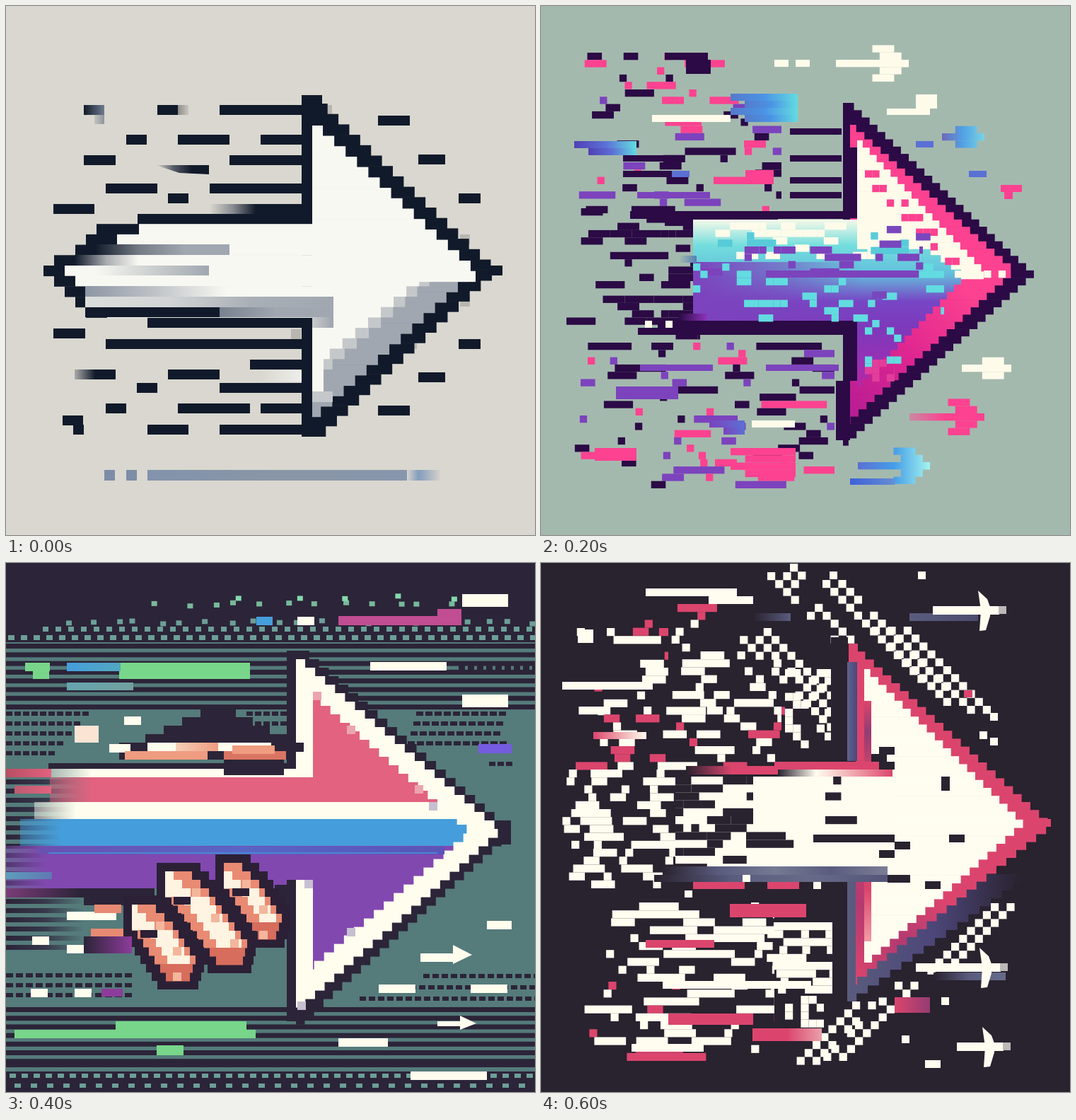
An HTML page with a canvas for the animation above (0.8 s loop, 748x748 px).

```html
<!DOCTYPE html>
<html lang="en">
<head>
<meta charset="utf-8">
<title>Arrow</title>
<style>
html, body { margin: 0; width: 100%; height: 100%; overflow: hidden; background: #d9d7cf; }
canvas { display: block; width: 100vw; height: 100vh; }
</style>
</head>
<body>
<canvas id="stage" width="748" height="748"></canvas>
<script>
const g = document.getElementById('stage').getContext('2d');
const HOLD = 200;
let seed = 1;
const rnd = () => (seed = seed * 16807 % 2147483647) / 2147483647;
const pick = list => list[Math.floor(rnd() * list.length)];
const lerp = (a, b, t) => a + (b - a) * t;

function box(c, x, y, w, h) {
  g.fillStyle = c;
  g.fillRect(x, y, w, h);
}
function ramp(x0, y0, x1, y1, colors) {
  const r = g.createLinearGradient(x0, y0, x1, y1);
  colors.forEach((c, i) => r.addColorStop(i / (colors.length - 1), c));
  return r;
}
const fade = (x, y, w, h, ...colors) => box(ramp(x, 0, x + w, 0, colors), x, y, w, h);

function poly(c, ...v) {
  g.fillStyle = c;
  g.beginPath();
  for (let i = 0; i < v.length; i += 2) g.lineTo(v[i], v[i + 1]);
  g.fill();
}
// Equal bars at several places
function spots(c, w, h, ...places) {
  for (const [x, y] of places) box(c, x, y, w, h);
}
// Triangle pointing right with stepped edges
function wedge(c, s, left, [ax, ay], [tx, ty], [bx, by]) {
  for (let y = ay; y < by - 1; y += s) {
    const m = y + s / 2;
    const edge = m < ty ? lerp(ax, tx, (m - ay) / (ty - ay)) : lerp(tx, bx, (m - ty) / (by - ty));
    box(c, left, y, Math.max(0, edge - left), s + 0.6);
  }
}
// Random runs of cells; density may depend on x
function scatter(c, s, x0, y0, x1, y1, density, run = 1) {
  for (let y = y0; y < y1 - 1; y += s)
    for (let x = x0; x < x1;) {
      const n = 1 + Math.floor(rnd() * run);
      const p = typeof density === 'function' ? density(x) : density;
      if (rnd() < p) box(c, x, y, Math.min(n * s, x1 - x), s);
      x += n * s;
    }
}
// Rows of loose dashes with random lengths and gaps
function streaks(colors, s, x0, y0, x1, y1, len, gap) {
  for (let y = y0; y < y1 - 1; y += s)
    for (let x = x0 + rnd() * gap; x < x1;) {
      const w = s * Math.ceil(rnd() * rnd() * len);
      box(pick(colors), x, y, Math.min(w, x1 - x), s);
      x += w + s + rnd() * gap;
    }
}
function dots(c, x0, x1, y, step, w, h) {
  for (let x = x0; x < x1; x += step) box(c, x, y, w, h);
}
function sparseDots(c, x0, x1, y, step) {
  for (let x = x0; x < x1; x += step) box(c, x + rnd() * step / 2, y + rnd() * 6, 8, 7);
}
// Diagonal chequered band; dir is 1 for falling, -1 for rising
function checker(c, s, x, y, rows, cols, dir) {
  for (let r = 0; r < rows; r++)
    for (let k = 0; k < cols; k++)
      if (rnd() < 0.85) box(c, x + (dir * r + 2 * k) * s, y + r * s, s, s);
}
// Small arrow: a bar with a stepped head
function mini(c, x, y, len, s, reach) {
  box(c, x, y, len, s);
  for (let k = -reach; k <= reach; k++) {
    const a = Math.abs(k);
    box(c, x + len - (a + 3) * s, y + k * s, 3 * s, s);
  }
}
function blob(x, y, w, rows, s, ...colors) {
  for (let i = 0; i < rows; i++) {
    const inset = (i % 2) * 2 * s;
    fade(x + inset, y + i * s, w - inset, s, ...colors);
  }
}

function ink() {
  const bg = '#d9d7cf', dark = '#111a2a', white = '#f8f8f2', grey = '#a0a7b0', pale = '#c5c8ca';
  const s = 14.7, mid = 374;
  box(bg, 0, 0, 748, 748);

  // Speed lines
  const lines = [[302, 140], [360, 182], [316, 211], [288, 251], [141, 471], [345, 500], [302, 533], [360, 562], [302, 592]];
  for (const [x, y] of lines) box(dark, x, y, 418 - x, 14);
  spots(dark, 29, 14, [214, 140], [170, 182], [229, 265], [185, 533], [141, 562], [80, 579]);
  spots(dark, 45, 14, [110, 211], [67, 456]);
  spots(dark, 58, 14, [67, 280], [200, 592]);
  spots(dark, 73, 14, [243, 182], [141, 251], [229, 514]);
  box(dark, 243, 562, 102, 14);
  box(dark, 95, 592, 15, 14);
  for (let i = 0; i < 3; i++)
    for (const y of [155 + i * 55, 565 - i * 47]) box(dark, 526 + i * 57, y, 45 - i * 7, 14);
  fade(110, 140, 29, 14, dark, '#6f7b90');
  fade(125, 154, 14, 13, '#c4c3c0', '#8f949d');
  fade(243, 140, 15, 14, '#8e8a89', '#c9c6bf');
  poly(ramp(212, 0, 287, 0, [bg, '#555b66', dark, dark]), 212, 225, 287, 225, 287, 238, 245, 236);
  fade(97, 514, 58, 14, '#aaa', dark, dark);
  fade(358, 515, 60, 16, bg, '#ededea');
  fade(288, 280, 130, 14, bg, '#8a8c92', dark, dark, dark);
  spots('#b9b6b1', 14, 14, [447, 140], [567, 280], [642, 323], [567, 471], [642, 411], [403, 457]);

  // Head
  box(dark, 418, 126, 29, 480);
  wedge(dark, s, 418, [447, 138], [694, mid], [447, 606]);
  box(dark, 680, 367, 22, 14);
  wedge(grey, s, 433, [440, 169], [664, mid], [440, 578]);
  wedge(pale, s, 447, [450, 381], [606, 382], [450, 516]);
  wedge(white, s, 433, [440, 169], [664, mid], [664, 381]);
  wedge(white, s, 433, [592, 381], [592, 382], [447, 500]);
  box(white, 433, 455, 16, 90);
  box(pale, 433, 545, 29, 15);

  // Shaft, pointed at its left end
  box(dark, 186, 294, 247, 15);
  box(dark, 200, 440, 233, 15);
  for (let k = -4; k <= 4; k++) {
    const y = 367 + k * s, left = 53 + 15 * Math.abs(k) + (k < -1 ? 15 : 0);
    const edge = k === -4 ? 60 : k === -3 ? 44 : 30;
    box(dark, left, y, edge, s + 0.4);
    box(white, left + edge, y, 460 - left - edge, s + 0.4);
  }
  fade(126, 337, 190, 15, dark, '#777d87', grey, grey);
  fade(97, 352, 90, 15, dark, '#a9acb0', white);
  fade(126, 367, 161, 14, white, '#cccfcf', grey);
  fade(112, 396, 200, 15, '#8d96a4', '#c0c4c8', white);
  fade(112, 411, 351, 15, '#dcdedb', '#d2d5d5', '#a9afb6', grey);
  box(dark, 112, 426, 200, 14);
  fade(302, 426, 161, 14, '#78818f', grey, grey);
  fade(433, 440, 30, 15, '#c8cacc', '#9ea5af');

  spots('#7d8da7', 15, 15, [139, 656], [170, 656]);
  fade(200, 656, 367, 15, '#8293ab', '#8996a6', '#8796ac');
  fade(568, 656, 45, 15, '#d1d1cd', '#849dbd', '#aab5c2', '#d2d0c9');
}

function neon() {
  const bg = '#a4b9ae', dark = '#2b0a45', pink = '#fc4290', cream = '#fefbea';
  const violet = '#7c43bd', cyan = '#62dce0', blue = '#5b70d5', s = 10.3;
  box(bg, 0, 0, 748, 748);

  // Loose dashes
  const mix = [dark, dark, dark, pink, pink, violet];
  streaks(mix, s, 60, 66, 260, 118, 7, 160);
  streaks(mix, s, 40, 118, 340, 285, 9, 160);
  streaks(mix, s, 40, 476, 415, 675, 9, 150);
  for (const y of [173, 211, 242, 263]) box(dark, 352, y, 73, 9);
  for (const y of [211, 233]) box(dark, 116, y, 70, 9);
  box(dark, 175, 66, 61, s);
  box(dark, 205, 76, 35, 20);
  box(cream, 157, 154, 111, 10);
  spots(cream, 20, 10, [330, 76], [360, 76]);
  box(cream, 298, 586, 61, 10);
  box(cream, 489, 145, 61, 9);
  box(cream, 530, 125, 30, 20);
  box(violet, 106, 538, 88, 18);
  spots(violet, 103, 9, [140, 507], [318, 507], [136, 263]);
  box(pink, 289, 232, 40, 20);
  box(pink, 76, 625, 59, 18);
  blob(268, 625, 92, 4, s, pink, pink);
  blob(268, 124, 95, 4, 10, '#557acb', '#4b93e5', cyan);
  blob(47, 191, 88, 2, 10, '#5040b4', blue, cyan);
  blob(238, 586, 50, 2, 10, violet, blue);
  spots(blue, 25, 9, [185, 233], [530, 191], [605, 233]);
  box(pink, 650, 253, 30, 10);
  box(pink, 655, 263, 12, 10);

  mini(cream, 417, 76, 103, s, 2);
  mini(cream, 595, 507, 70, s, 1);
  mini(ramp(521, 0, 570, 0, ['#c98aa2', pink]), 521, 576, 106, s, 2);
  mini(ramp(567, 0, 627, 0, ['#7167b9', '#51a3e4', '#79d4e5']), 567, 180, 60, s, 1);
  mini(ramp(448, 0, 550, 0, [blue, '#459de8', '#a2f5ef']), 448, 645, 102, s, 2);
  fade(437, 668, 63, 9, '#3d61d8', '#668dd4');

  // Shaft breaking up towards the left
  scatter(dark, s, 36, 286, 225, 465, x => lerp(0.12, 0.55, (x - 36) / 190), 4);
  box(dark, 126, 290, 321, 11);
  box(dark, 175, 300, 160, 11);
  box(dark, 165, 445, 282, 11);
  box(dark, 137, 455, 310, 10);
  const body = ramp(0, 300, 0, 535, [cream, '#72dddd', '#63bfdc', '#7746c5', '#7e38ba', '#9332b6', '#b528a4']);

  // Head
  box(dark, 427, 137, 10, 477);
  box(dark, 417, 530, 20, 84);
  wedge(dark, s, 427, [437, 137], [697, 379], [437, 614]);
  wedge(ramp(437, 583, 600, 400, ['#b61c94', '#df2690', pink]), s, 437, [440, 168], [670, 374], [440, 583]);
  box(dark, 427, 200, 20, 100);
  box(dark, 427, 445, 20, 85);
  wedge(cream, s, 447, [450, 190], [626, 374], [626, 380]);
  wedge(body, s, 447, [500, 311], [600, 382], [447, 540]);
  box(body, 215, 302, 240, 143);
  fade(215, 362, 240, 83, violet, '#7c43bd99', '#7c43bd00');
  fade(195, 353, 25, 10, bg, '#557fb6');
  fade(195, 435, 40, 10, dark, '#8d35ba');
  wedge(cream, s, 447, [540, 302], [560, 340], [560, 342]);
  for (let i = 0; i < 13; i++)
    for (let k = 0; k < 3; k++)
      if ((i + k) % 2 && rnd() < 0.9) box(pink, 458 + i * s, 222 + (i + k) * s, s, s);

  // Pixels inside
  scatter(cream, s, 226, 306, 447, 325, 0.6, 3);
  scatter(cream, s, 235, 327, 520, 352, 0.2, 2);
  scatter('#58cbd9', s, 250, 320, 520, 348, 0.25, 4);
  scatter(violet, s, 226, 340, 540, 372, 0.2, 3);
  box(violet, 318, 374, 222, 10);
  scatter(cyan, s, 215, 364, 570, 442, 0.18, 2);
  scatter(cyan, s, 458, 444, 510, 515, 0.2);
  scatter('#7947bd', s, 458, 311, 560, 420, 0.12, 3);
  scatter('#e33d9b', s, 458, 500, 500, 530, 0.4);
  dots(cream, 585, 660, 374, 2 * s, s, s);
  dots(cream, 147, 180, 445, 29, 10, 10);
}

function finger(x, y, w, rows, shift) {
  const left = i => x + Math.max(0, i - 2) * shift;
  const width = i => w + (i > 1 && i < rows - 2 ? 12 : i === 0 || i === rows - 1 ? -12 : 0);
  for (let i = 0; i < rows; i++) box('#2c2036', left(i) - 12, y + i * 12 - 12, width(i) + 24, 36);
  for (let i = 0; i < rows; i++) {
    const px = left(i), py = y + i * 12, pw = width(i);
    box(i > rows - 3 ? '#d76d5c' : '#e98a73', px, py, pw, 12.5);
    if (i < rows - 2) box('#fff3e1', px + (i > 2 ? 18 : 0), py, pw - 26, 12.5);
    if (i % 3 === 2) box('#f3b69c', px + pw - 24, py, 12, 12);
  }
  box('#2c2036', x + 12, y + 36, 24, 11);
}

function retro() {
  const dark = '#2c2438', teal = '#557b7b', cream = '#fffdee', green = '#78d68a', mint = '#6c9f98';
  const pink = '#e2627f', blue = '#459edb', violet = '#8148b0', magenta = '#c14d93';
  const salmon = '#ef9c80', s = 12;
  box(teal, 0, 0, 748, 748);

  // Top and bottom bands
  box(dark, 0, 0, 748, 112);
  sparseDots('#78b99b', 205, 620, 52, 37);
  sparseDots('#84d9ad', 320, 610, 42, 70);
  sparseDots(mint, 75, 748, 78, 33);
  dots(mint, 52, 748, 90, 18, 8, 7);
  dots(mint, 3, 748, 102, 18, 9, 7);
  for (let y = 114; y < 205; y += 12.3) box(dark, 0, y, 748, 7);
  for (let y = 628; y < 705; y += 12.2) box(dark, 0, y, 748, 7);
  box(dark, 0, 705, 748, 43);
  box(teal, 0, 713, 748, 6);
  dots(mint, 5, 748, 722, 17, 9, 6);
  dots(mint, 12, 748, 736, 23, 9, 6);

  // Dotted rows
  for (let i = 0; i < 5; i++) {
    const y = 210 + i * 14;
    dots(dark, 0, 110 - i * 12, y, s, 9, 6);
    if (i < 2) dots(dark, 340, 398, y, s, 9, 6);
    if (i < 4) dots(dark, 580 - i * 4, 700, y, 13, 10, 6);
    if (i < 3) dots(dark, 0, 180, 580 + i * 14, 14, 10, 6);
    if (i < 3) dots(dark, 590 - i * 45, 748, 581 + i * 16, 13, 9, 6);
  }
  dots(dark, 683, 718, 281, s, 9, 6);
  dots(dark, 640, 748, 143, 13, 9, 8);
  for (let y = 306; y < 545; y += 13) fade(0, y, 110, 7, dark, '#36384a', teal);

  // Coloured glitches
  box(green, 27, 141, 35, s);
  box(green, 38, 152, 23, s);
  box(green, 160, 141, 185, 23);
  box(green, 12, 660, 341, s);
  box(green, 155, 648, 185, s);
  box(green, 213, 682, 38, 14);
  fade(86, 141, 76, s, blue, '#52a7bf');
  fade(86, 169, 94, 11, '#65a5b0', '#72a0a0');
  box(blue, 354, 76, 23, s);
  box(magenta, 470, 75, 174, 13);
  box(magenta, 610, 65, 34, s);
  box('#755be0', 668, 256, 47, 13);
  spots(cream, 24, s, [412, 76], [167, 217], [37, 528], [86, 540], [35, 602], [97, 602]);
  spots(cream, 52, s, [527, 596], [657, 596], [586, 552]);
  spots(cream, 65, 18, [645, 44], [645, 186]);
  spots(cream, 108, s, [515, 140], [572, 719]);
  box(cream, 470, 672, 70, s);
  box(cream, 680, 506, 35, s);
  box(cream, 86, 493, 70, s);
  box(cream, 610, 648, 35, 7);
  box('#fbe4d4', 97, 230, 34, 24);
  poly(cream, 632, 540, 659, 554, 632, 567);
  poly(cream, 642, 640, 665, 651, 642, 660);

  // Shaft
  box(dark, 60, 283, 340, 8);
  const stripes = [[cream, 291, 62], [pink, 303, 62], [cream, 338, 40], [blue, 362, 20], [violet, 400, 0]];
  const ends = [303, 338, 362, 400, 460];
  const paint = ramp(0, 0, 0, 1, [cream, cream]);
  stripes.forEach(([c, y, x], i) => {
    const right = i === 4 ? 400 : 440;
    fade(x, y, 60, ends[i] - y, c + '77', c);
    box(c, x + 58, y, right - x - 58, ends[i] - y);
  });
  fade(0, 291, 64, s, '#b84e62', pink);
  fade(12, 315, 52, 11, '#bb5c70', pink);
  fade(0, 437, 65, 10, '#5d9dbc', '#6177b3');
  fade(0, 460, 210, 13, '#7b3c79', dark, dark);
  box(dark, 110, 472, 60, s);

  // Head
  box(dark, 397, 124, 25, 167);
  box(dark, 397, 448, 25, 200);
  wedge(dark, s, 410, [422, 124], [716, 380], [418, 650]);
  box(dark, 690, 364, 24, 34);
  wedge(cream, s, 410, [416, 136], [700, 378], [412, 632]);
  const inner = g.createLinearGradient(0, 190, 0, 570);
  stripes.slice(1).forEach(([c, y], i) => {
    inner.addColorStop(Math.max(0, (y - 190) / 380), i ? c : pink);
    inner.addColorStop(i < 3 ? (ends[i + 1] - 190) / 380 : 1, c);
  });
  wedge(inner, s, 434, [438, 190], [656, 380], [438, 566]);
  stripes.slice(1).forEach(([c, y], i) => box(c, 395, y, 45, Math.min(ends[i + 1], 448) - y));
  fade(45, 401, 575, 11, '#6b50b1', '#5765c5', '#5a54b9');
  box('#4b86d0', 60, 409, 550, 2);
  spots('#c7bfd0', s, s, [598, 338], [422, 448], [482, 516], [412, 620]);
  spots('#eba5ac', s, s, [434, 182], [482, 230], [578, 314]);

  // Upper hand: steps widening downwards
  for (let i = 0; i < 5; i++) {
    const y = 206 + i * s;
    box(dark, 275 - i * 26, y, 50 + i * 50, 13);
    if (i) box(cream, 305 - i * 26, y + s, 8 + i * 36, s);
  }
  box(dark, 160, 254, 238, 24);
  box(dark, 308, 278, 85, 22);
  box(cream, 200, 254, 175, s);
  box(cream, 146, 256, 30, s);
  fade(240, 254, 60, s, '#f7cfb7', salmon);
  box(salmon, 168, 266, 117, s);
  box('#db7563', 308, 266, 88, s);
  box(salmon, 320, 258, 60, s);

  // Fingers
  box(dark, 166, 470, 60, 60);
  box(dark, 380, 455, 20, 70);
  finger(308, 424, 38, 9, 8);
  finger(225, 436, 50, 11, 9);
  finger(178, 483, 46, 9, 8);
  box('#e88a73', 120, 517, 46, s);
  box('#e88a73', 125, 483, 38, s);
  fade(110, 528, 68, 24, dark, '#8d3c9b');
  box('#8d3c9b', 135, 602, 30, 11);
}

function mono() {
  const dark = '#29222f', cream = '#fffdf0', pink = '#db456d', slate = '#5a5c7e', navy = '#4c4679';
  const s = 11.2;
  box(dark, 0, 0, 748, 748);

  // Chequered trails
  for (const [x, y, rows, cols] of [[320, 13, 10, 2], [352, 1, 3, 1], [398, 24, 14, 2], [468, 90, 11, 3], [270, 92, 14, 3]])
    checker(cream, s, x, y, rows, cols, 1);
  for (const [x, y, rows, cols] of [[636, 481, 9, 2], [500, 592, 10, 2], [440, 620, 8, 2]])
    checker(cream, s, x, y, rows, cols, -1);
  scatter(cream, s, 345, 150, 410, 255, 0.45);
  scatter(cream, s, 345, 612, 400, 650, 0.4);
  spots(cream, 11, 11, [533, 12], [408, 12], [635, 212], [620, 238], [635, 247], [566, 614], [510, 668]);
  box(cream, 543, 703, 22, 11);
  box(pink, 598, 180, 12, 10);
  fade(500, 614, 50, 22, pink, '#943c72');

  // Dashes swept to the left
  const mix = [cream, cream, cream, cream, cream, pink];
  streaks(mix, s, 125, 58, 260, 125, 7, 100);
  streaks(mix, s, 50, 92, 180, 205, 6, 150);
  streaks(mix, s, 175, 125, 345, 205, 8, 55);
  streaks(mix, s, 40, 203, 340, 292, 10, 75);
  streaks([cream], s, 30, 292, 190, 450, 9, 45);
  streaks(mix, s, 50, 480, 330, 700, 14, 110);
  streaks([cream], s, 318, 508, 414, 602, 14, 26);
  box(cream, 148, 36, 129, 11);
  box(cream, 237, 47, 63, 11);
  box(cream, 30, 168, 128, 11);
  box(cream, 52, 94, 22, 19);
  box(cream, 172, 591, 210, 11);
  box(cream, 128, 680, 102, 11);
  box(pink, 267, 482, 108, 19);
  box(pink, 148, 533, 97, 11);
  box(pink, 180, 637, 120, 16);
  fade(299, 658, 98, 18, pink, pink, '#e9a0aa');
  fade(74, 239, 75, 10, pink, '#efa6ae', cream);
  fade(300, 71, 53, 11, dark, slate);

  // Head
  box(dark, 410, 105, 24, 170);
  box(dark, 412, 500, 24, 115);
  wedge(ramp(433, 0, 680, 0, [slate, navy, dark]), s, 433, [440, 440], [690, 441], [440, 618]);
  wedge(ramp(445, 590, 560, 470, [pink, '#b33a70', pink]), s, 445, [440, 114], [722, 371], [442, 594]);
  fade(433, 140, 14, 140, '#5f638e', navy);
  box(pink, 435, 114, 13, 26);
  box(pink, 708, 362, 13, 11);
  wedge(cream, s, 457, [460, 150], [682, 368], [460, 566]);
  box(ramp(0, 195, 0, 282, [pink, '#943c72', '#c5426c']), 457, 195, 10, 87);
  box(ramp(0, 462, 0, 535, [pink, '#f49ba5']), 457, 450, 10, 85);

  // Shaft
  box(cream, 190, 302, 315, 128);
  box(pink, 330, 281, 160, 12);
  fade(205, 287, 130, 12, dark, pink, pink);
  fade(335, 292, 162, 10, dark, cream, '#f1a4ad', pink);
  scatter(dark, s, 190, 302, 300, 428, x => lerp(0.6, 0.15, (x - 190) / 110), 4);
  scatter(dark, s, 290, 302, 450, 425, 0.14, 7);
  box(dark, 385, 384, 115, 11);
  fade(172, 429, 318, 12, dark, slate, '#747a92', slate, '#7c7d96');
  fade(160, 441, 330, 10, dark, slate, '#676b88', '#55557a');
  box(pink, 215, 451, 73, 10);
  box(pink, 320, 451, 45, 10);
  spots(cream, 11, 10, [285, 441], [385, 451], [203, 463]);

  // Holes in the head
  spots(dark, 22, 11, [478, 260], [467, 270], [478, 281], [577, 384], [500, 394], [478, 406], [543, 450]);
  box(dark, 566, 302, 12, 20);
  box(dark, 490, 441, 32, 11);

  // Small flying arrows
  fade(521, 71, 97, 11, slate, '#4c4c70');
  fade(555, 579, 102, 11, dark, slate, '#676b8b');
  for (const [x, y, tail] of [[618, 67, 64], [620, 572, 90], [624, 684, 36]]) {
    box(cream, x - tail, y - 6, tail + 30, 12);
    poly(cream, x, y - 28, x + 13, y - 16, x + 17, y - 5, x + 17, y + 8, x + 11, y + 28, x + 2, y + 29, x + 4, y);
    box('#bbb9b8', x + 29, y - 6, 11, 11);
  }
}

const scenes = [ink, neon, retro, mono];
let shown = -1;
const start = performance.now();
function draw(now) {
  const i = Math.floor(Math.max(0, now - start) / HOLD) % scenes.length;
  if (i !== shown) {
    shown = i;
    seed = 4271 + i * 97;
    scenes[i]();
  }
  requestAnimationFrame(draw);
}
draw(start);
</script>
</body>
</html>
```
